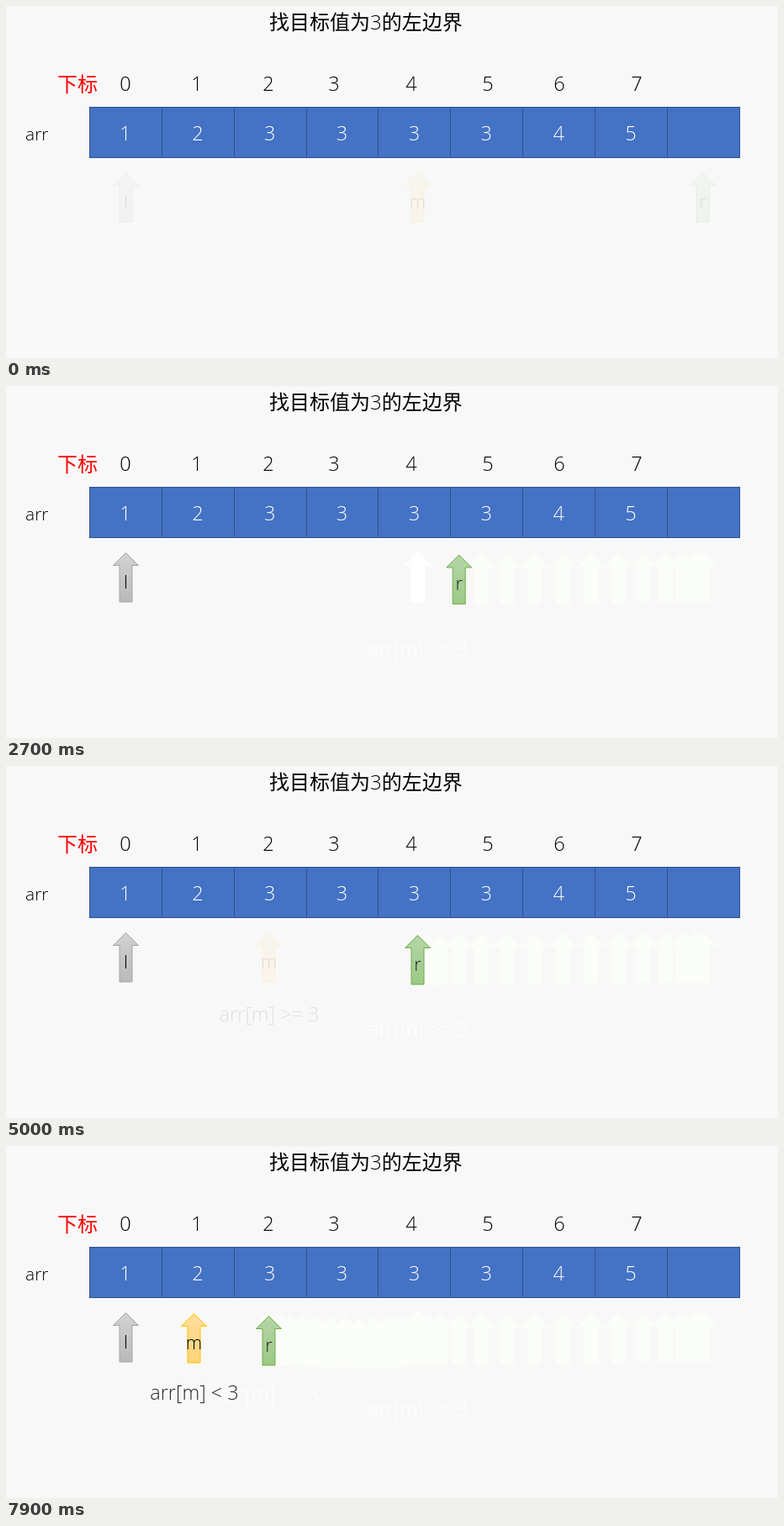
Recreate the animation shown at these times as an HTML page with a canvas. Size 918 px wide and 419 px high, loop 8000 ms.

```html
<!DOCTYPE html>
<html lang="zh-CN">
<head>
<meta charset="utf-8">
<title>左边界</title>
<style>
  html, body { margin: 0; height: 100%; overflow: hidden; background: #f8f8f8; }
  canvas { display: block; }
</style>
</head>
<body>
<canvas id="stage" width="918" height="419"></canvas>
<script>
const ctx = document.getElementById('stage').getContext('2d');
const LOOP = 8000, STEP = 100, FADE = 500, MOVE = 1500;
const CELL = 85.85, TOP = 198.5;
const FONT = '"Open Sans", "Noto Sans CJK SC", "Noto Sans CJK", sans-serif';

// [top colour, bottom colour, outline]
const GREY = ['#d2d2d2', '#bababa', '#a5a5a5'];
const YELLOW = ['#ffdd9c', '#ffd479', '#ffc000'];
const GREEN = ['#b5d5a7', '#9cca86', '#70ad47'];

// The right pointer glides to each middle in turn
const MOVES = [
  { start: 1560, dx: -339, dy: 3, bow: 0 },
  { start: 5360, dx: -177, dy: 1, bow: 18 }
];

// Middle pointer of each round; its comparison follows one fade later
const ROUNDS = [
  { x: 489.5, top: TOP, text: 'arr[m] >= 3', base: 322, from: -50, to: 950, trail: '#fff' },
  { x: 312.5, top: TOP, text: 'arr[m] >= 3', base: 304, from: 3200, to: 4550, trail: '#fdfff8' },
  { x: 223.5, top: TOP + 1, text: 'arr[m] < 3', base: 302, from: 6980, to: LOOP }
];

const clamp = v => Math.max(0, Math.min(1, v));
const fade = (t, start) => clamp((t - start) / FADE);
const ease = p => p * p * (3 - 2 * p);

function rightAt(t) {
  let x = 828.5, y = TOP;
  for (const m of MOVES) {
    const p = ease(clamp((t - m.start) / MOVE));
    x += m.dx * p;
    y += m.dy * p + m.bow * p * (1 - p) ** 2;
  }
  return [x, y];
}

function label(str, x, y, { color = '#000', align = 'center', size = 23.5 } = {}) {
  ctx.font = `350 ${size}px ${FONT}`;
  ctx.fillStyle = color;
  ctx.textAlign = align;
  ctx.fillText(str, x, y);
}

function arrowShape(x, top, fill, stroke, width) {
  ctx.beginPath();
  ctx.moveTo(x, top);
  for (const side of [1, -1]) {
    const edge = [[15, 15], [7.5, 15], [7.5, 58.5]];
    if (side < 0) edge.reverse();
    for (const [dx, dy] of edge) ctx.lineTo(x + side * dx, top + dy);
  }
  ctx.closePath();
  ctx.fillStyle = fill;
  ctx.strokeStyle = stroke;
  ctx.lineWidth = width;
  ctx.fill();
  ctx.stroke();
}

function arrow(x, top, [light, dark, line], name, alpha, color) {
  const g = ctx.createLinearGradient(0, top, 0, top + 58);
  g.addColorStop(0, light);
  g.addColorStop(1, dark);
  ctx.globalAlpha = alpha;
  arrowShape(x, top, g, line, 1);
  label(name, x, Math.round(top + 42), { color, size: 22 });
  ctx.globalAlpha = 1;
}

const trail = (x, top, color) => arrowShape(x, top, color, color, 2);

function table() {
  ctx.fillStyle = '#f8f8f8';
  ctx.fillRect(0, 0, 918, 419);
  label('找目标值为3的左边界', 313, 28, { align: 'left', size: 24 });
  label('下标', 61, 102, { color: '#f00', align: 'left', size: 24 });
  label('arr', 23, 160, { align: 'left', size: 21 });
  [142, 227, 312, 390, 482, 573, 658, 750].forEach((x, i) => label(i, x, 101));
  ctx.fillStyle = '#4472c4';
  ctx.fillRect(99, 120, 773, 61);
  ctx.strokeStyle = '#2f528f';
  ctx.lineWidth = 1;
  for (let i = 0; i < 9; i++) {
    const left = Math.round(99 + i * CELL), right = Math.round(99 + (i + 1) * CELL);
    ctx.strokeRect(left + 0.5, 120.5, right - left, 60);
    label('12333345'[i] || '', 142 + i * CELL, 160, { color: '#fff' });
  }
}

function draw(t) {
  table();
  // Pale traces left by pointers that have gone
  for (const r of ROUNDS) {
    if (t < r.to + FADE) continue;
    trail(r.x, r.top, r.trail);
    label(r.text, r.x + 0.5, r.base, { color: '#fff' });
  }
  for (let s = MOVES[0].start - MOVES[0].start % STEP; s < t; s += STEP)
    trail(...rightAt(s), '#fafdf8');

  const intro = fade(t, ROUNDS[0].from);
  arrow(142.5, TOP, GREY, 'l', intro);
  for (const r of ROUNDS) {
    const stay = 1 - fade(t, r.to);
    arrow(r.x, r.top, YELLOW, 'm', fade(t, r.from) * stay);
    ctx.globalAlpha = fade(t, r.from + FADE) * stay;
    label(r.text, r.x + 0.5, r.base);
    ctx.globalAlpha = 1;
  }
  arrow(...rightAt(t), GREEN, 'r', intro, '#222');
}

const start = performance.now();
function tick() {
  const t = (performance.now() - start) % LOOP;
  draw(Math.floor(t / STEP) * STEP);
  requestAnimationFrame(tick);
}
tick();
</script>
</body>
</html>
```
